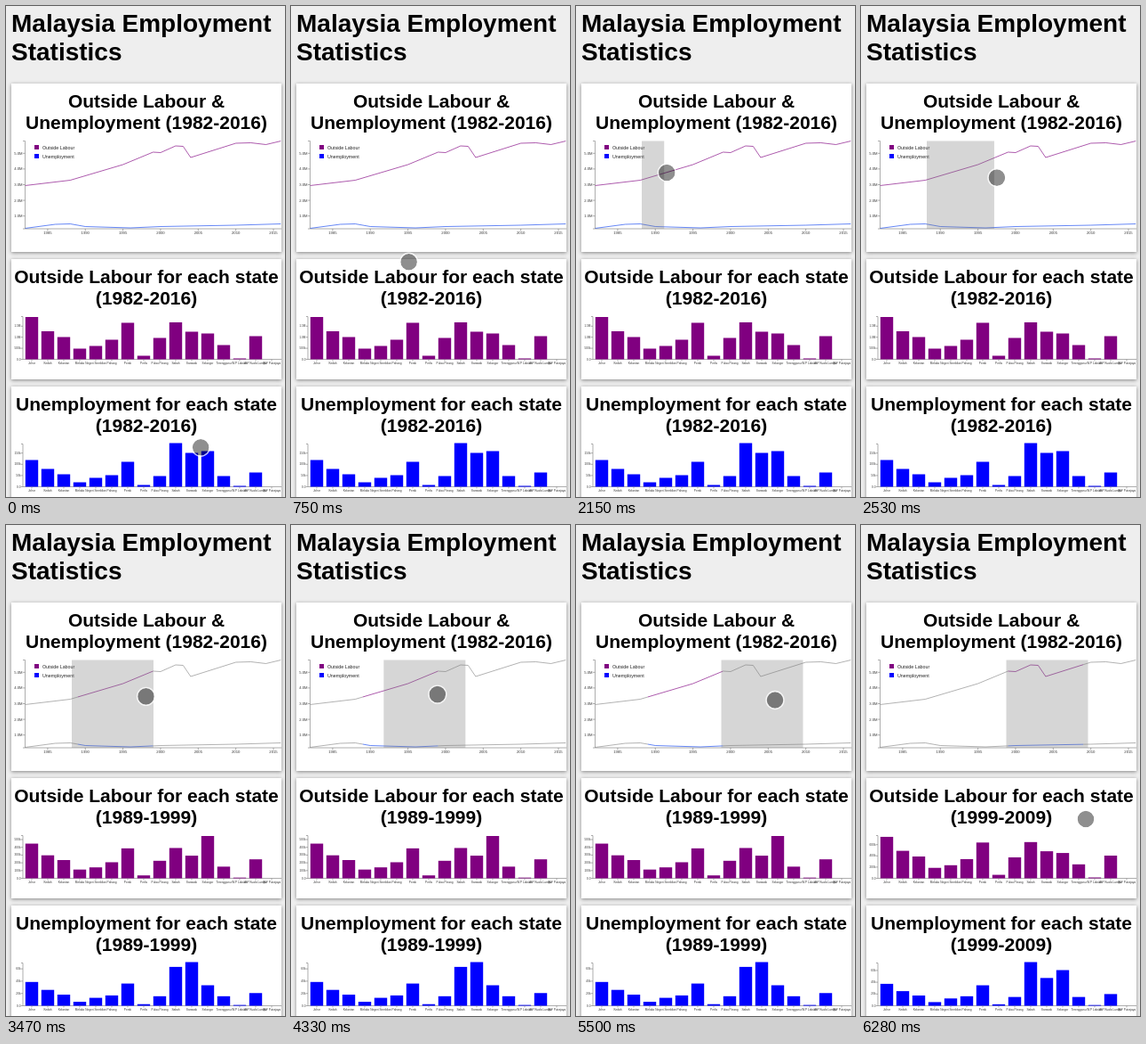
Recreate the animation shown at these times as an HTML page with a canvas. Size 314 by 551 pixels, loop 6.36 s.

```html
<!DOCTYPE html>
<html lang="en">
<head>
<meta charset="utf-8">
<title>Malaysia Employment Statistics</title>
<style>
  html, body { margin: 0; width: 100%; height: 100%; overflow: hidden; background: #eee; }
  canvas { display: block; width: 314px; height: 551px; }
</style>
</head>
<body>
<canvas id="stage"></canvas>
<script>
const WIDTH = 314, HEIGHT = 551, LOOP = 6360;
const canvas = document.getElementById('stage');
const ctx = canvas.getContext('2d');
const ratio = window.devicePixelRatio || 1;
canvas.width = WIDTH * ratio;
canvas.height = HEIGHT * ratio;

// Bar heights per state over the whole time span
const states = [
  { name: 'Johor', labour: 47.5, jobless: 30 },
  { name: 'Kedah', labour: 31.5, jobless: 20 },
  { name: 'Kelantan', labour: 25, jobless: 14 },
  { name: 'Melaka', labour: 12, jobless: 5 },
  { name: 'Negeri Sembilan', labour: 15, jobless: 10 },
  { name: 'Pahang', labour: 22, jobless: 13 },
  { name: 'Perak', labour: 41, jobless: 28 },
  { name: 'Perlis', labour: 4, jobless: 2 },
  { name: 'Pulau Pinang', labour: 24, jobless: 12 },
  { name: 'Sabah', labour: 41.5, jobless: 49 },
  { name: 'Sarawak', labour: 31, jobless: 38 },
  { name: 'Selangor', labour: 29, jobless: 40 },
  { name: 'Terengganu', labour: 16, jobless: 12 },
  { name: 'W.P Labuan', labour: 1, jobless: 1 },
  { name: 'W.P Kuala Lumpur', labour: 26, jobless: 16 },
  { name: 'W.P Putrajaya', labour: 0, jobless: 0 }
];

// A period scales every bar; "except" holds the states that break the trend.
// Ticks: value in thousands and distance in pixels.
const periods = [
  { start: 0, from: 1982, to: 2016,
    labour: { scale: 1, tick: 500, gap: 12.4, except: {} },
    jobless: { scale: 1, tick: 50, gap: 12.6, except: {} } },
  { start: 2760, from: 1989, to: 1999,
    labour: { scale: 0.82, tick: 100, gap: 8.7, except: { Selangor: 47.5 } },
    jobless: { scale: 0.89, tick: 20, gap: 13.8, except: { Sarawak: 49, Selangor: 23 } } },
  { start: 5580, from: 1999, to: 2009,
    labour: { scale: 0.98, tick: 200, gap: 12.6, except: {} },
    jobless: { scale: 0.82, tick: 20, gap: 13.2, except: { Sabah: 49, Selangor: 40 } } }
];

// Turning points of the curves: year, y
const labourCurve = [[1982, 201.5], [1988, 195.5], [1995, 178], [1999, 164], [2000, 164.5], [2002, 157],
  [2003, 157.5], [2004, 170], [2010, 154], [2012, 153.5], [2014, 155.5], [2016, 151.5]];
const joblessCurve = [[1982, 249.5], [1986, 245], [1988, 244.5], [1990, 247.5], [1996, 249], [2000, 247.5],
  [2010, 246], [2016, 244.5]];

const HOVER = 2.4, DRAG = 1.4;
const DRAG_START = 4090, DRAG_END = 5500;
const moves = [
  { start: 0, end: 350, x: 169.5, y: 390, power: HOVER },
  { start: 515, end: 1050, x: 120.5, y: 253.5, power: HOVER },
  { start: 1140, end: 1840, x: 75, y: 184, power: HOVER },
  { start: 1990, end: 2700, x: 165, y: 194, power: DRAG },
  { start: 3400, end: DRAG_START, x: 132.5, y: 187, power: HOVER },
  { start: DRAG_START, end: 4790, x: 205, y: 194, power: DRAG },
  { start: 4790, end: DRAG_END, x: 224, y: 196.5, power: DRAG },
  { start: 5980, end: 6280, x: 253, y: 330, power: HOVER }
];

const clamp = (v, low, high) => Math.min(high, Math.max(low, v));

function pointerAt(t) {
  let x = 219.5, y = 496;
  for (const move of moves) {
    const k = clamp((t - move.start) / (move.end - move.start), 0, 1);
    const eased = 1 - (1 - k) ** move.power;
    x += (move.x - x) * eased;
    y += (move.y - y) * eased;
  }
  return { x, y };
}

function brushAt(t) {
  const left = 74, width = 92;
  if (t < 2030) return null;
  if (t < periods[1].start) return { x: left, width: Math.max(0, pointerAt(t).x - 3 - left) };
  const shift = pointerAt(clamp(t, DRAG_START, DRAG_END)).x - 134.5;
  return { x: left + Math.max(0, shift), width };
}

function rect(x, y, w, h, color) {
  ctx.fillStyle = color;
  ctx.fillRect(x, y, w, h);
}

function text(str, x, y, size, { align = 'center', weight = '', color = '#000' } = {}) {
  ctx.font = `${weight} ${size}px "Liberation Sans", Arial, sans-serif`;
  ctx.textAlign = align;
  ctx.fillStyle = color;
  ctx.fillText(str, x, y);
}

function path(points, color, width) {
  ctx.beginPath();
  points.forEach(([x, y]) => ctx.lineTo(x, y));
  ctx.strokeStyle = color;
  ctx.lineWidth = width;
  ctx.stroke();
}

const axis = (...points) => path(points, '#777', 0.6);
const tickLabel = (str, x, y, size, align) => text(str, x, y, size, { align, color: '#333' });

function card(y, height, ...title) {
  ctx.save();
  ctx.shadowColor = 'rgba(0,0,0,.45)';
  ctx.shadowBlur = 4 * ratio;
  ctx.shadowOffsetY = ratio;
  rect(6, y, 304, height, '#fff');
  ctx.restore();
  title.forEach((line, i) => text(line, 158, y + 27 + 24 * i, 21, { weight: 'bold' }));
}

const yearX = year => 21.5 + (year - 1982) * 8.47;

// The selected years are coloured, the rest is grey
function series(curve, color, period) {
  const points = curve.map(([year, y]) => [yearX(year), y]);
  const part = (from, to, stroke) => {
    ctx.save();
    ctx.beginPath();
    ctx.rect(yearX(from), 150, yearX(to) - yearX(from), 101);
    ctx.clip();
    path(points, stroke, 0.65);
    ctx.restore();
  };
  part(1982, period.from, '#888');
  part(period.from, period.to, color);
  part(period.to, 2016, '#888');
}

function lineChart(period, brush) {
  card(87, 189, 'Outside Labour &', 'Unemployment (1982-2016)');
  axis([19, 151.5], [21.5, 151.5], [21.5, 250], [19, 250]);
  axis([21.5, 250], [310, 250]);
  for (let m = 1; m <= 5; m++) {
    const y = 253.3 - 17.6 * m;
    axis([19, y], [21.5, y]);
    tickLabel(m + '.0M', 18.5, y + 1.5, 4.2, 'right');
  }
  for (let year = 1985; year <= 2015; year += 5) {
    const x = yearX(year);
    axis([x, 250], [x, 252.5]);
    tickLabel(year, x, 256, 4.2);
  }
  [['Outside Labour', 'purple'], ['Unemployment', 'blue']].forEach(([label, color], i) => {
    rect(32, 156 + 10 * i, 5, 5, color);
    text(label, 41, 160.7 + 9.8 * i, 5.3, { align: 'left', color: '#222' });
  });
  series(labourCurve, 'purple', period);
  series(joblessCurve, '#1446f0', period);
  if (brush) rect(brush.x, 151.5, brush.width, 98.5, 'rgba(119,119,119,.3)');
}

function formatThousands(value) {
  if (!value) return '0.0';
  return value < 1000 ? value + 'k' : (value / 1000).toFixed(1) + 'M';
}

function barChart(cardY, title, period, key, color) {
  const base = cardY + 112.5;
  const { scale, tick, gap, except } = period[key];
  card(cardY, 135, `${title} for each state`, `(${period.from}-${period.to})`);
  axis([17, base - 48], [19, base - 48], [19, base], [310, base]);
  for (let i = 0; i * gap < 48; i++) {
    const y = base - i * gap;
    axis([17, y], [19, y]);
    tickLabel(formatThousands(i * tick), 16.5, y + 1, 3.2, 'right');
  }
  states.forEach((state, i) => {
    const x = 29 + 18 * i;
    const height = except[state.name] ?? state[key] * scale;
    rect(x - 7.2, base - height, 14.4, height, color);
    axis([x, base], [x, base + 2]);
    tickLabel(state.name, x, base + 5.7, 3.2);
  });
}

function disc({ x, y }, radius) {
  ctx.beginPath();
  ctx.arc(x, y, radius, 0, Math.PI * 2);
}

function drawPointer(pointer) {
  disc(pointer, 9.3);
  ctx.fillStyle = 'rgba(0,0,0,.44)';
  ctx.fill();
  disc(pointer, 10);
  ctx.strokeStyle = 'rgba(255,255,255,.75)';
  ctx.lineWidth = 1.4;
  ctx.stroke();
}

function draw(t) {
  const period = periods.filter(p => p.start <= t).pop();
  ctx.setTransform(ratio, 0, 0, ratio, 0, 0);
  rect(0, 0, WIDTH, HEIGHT, '#eee');
  const heading = { align: 'left', weight: 'bold' };
  text('Malaysia Employment', 6, 29, 28, heading);
  text('Statistics', 6, 61, 28, heading);
  lineChart(period, brushAt(t));
  barChart(284, 'Outside Labour', period, 'labour', 'purple');
  barChart(427, 'Unemployment', period, 'jobless', 'blue');
  drawPointer(pointerAt(t));
}

const origin = performance.now();
function frame() {
  draw((performance.now() - origin) % LOOP);
  requestAnimationFrame(frame);
}
frame();
</script>
</body>
</html>
```
